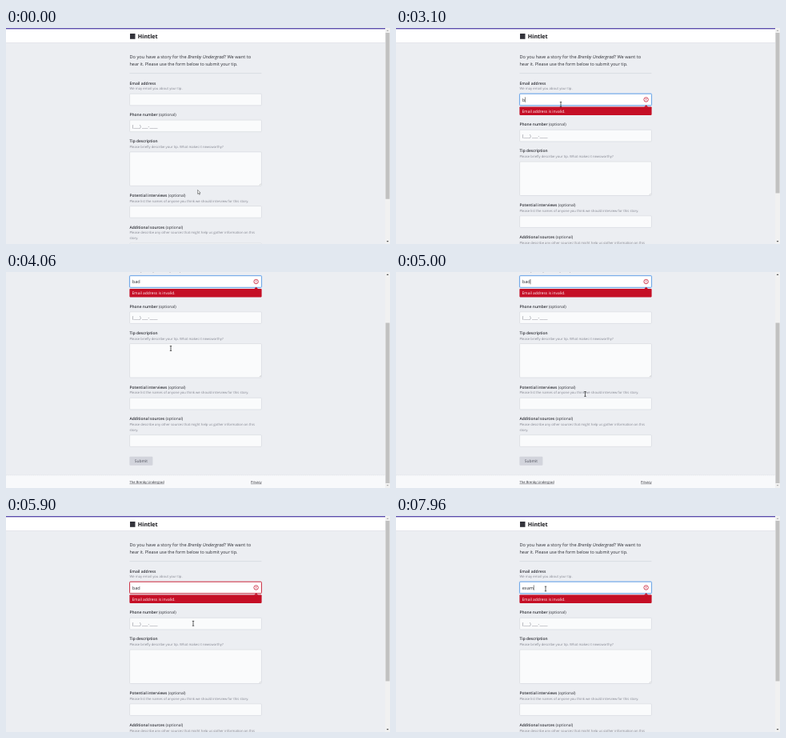
Recreate the animation shown at these times as an HTML page. Size 480 by 270 pixels, loop 8 s.

```html
<!DOCTYPE html>
<html lang="en">
<head>
<meta charset="utf-8">
<title>Hintlet</title>
<style>
html, body { margin: 0; height: 100%; overflow: hidden; background: #eceef2; }
svg { display: block; width: 100vw; height: 100vh; font: 4.9px "Open Sans", "Noto Sans", sans-serif; text-rendering: geometricPrecision; fill: #2b2c33; }
text { white-space: pre; }
.bold { font-weight: 600; }
.title { font-size: 7.1px; font-weight: 700; fill: #18181c; }
.intro { font-size: 5.65px; }
.intro2 { font-size: 5.47px; }
.help { font-size: 4.23px; fill: #82848f; }
.foot { font-size: 4.1px; text-decoration: underline; }
.typed { font-size: 5.6px; }
.mask { font-size: 5.6px; fill: #777983; }
.field { fill: #fafbfc; stroke: #d0d3da; stroke-width: .6; }
</style>
</head>
<body>
<svg viewBox="0 0 480 270">
  <rect width="480" height="270" fill="#eceef2"/>
  <g id="page">
    <rect width="474" height="18.5" fill="#fff"/>
    <rect width="474" height="1.4" fill="#5f52ae"/>
    <path d="M0 18.6H474" stroke="#d9dbe2" stroke-width=".6"/>
    <rect x="155" y="7" width="6.5" height="6.8" fill="#33333b"/>
    <text class="title" x="164.8" y="12.9">Hintlet</text>
    <text class="intro" x="154.5" y="38.2">Do you have a story for the <tspan font-style="italic">Brenby Undergrad</tspan>? We want to</text>
    <text class="intro2" x="154.5" y="47.1">hear it. Please use the form below to submit your tip.</text>
    <path d="M154.5 56.6H319.5" stroke="#cdd0d8" stroke-width=".6"/>
    <text class="bold" x="154.5" y="70.5">Email address</text>
    <text class="help" x="154.5" y="77.2">We may email you about your tip.</text>
    <rect id="halo" x="153.6" y="81.2" width="166.8" height="16.6" rx="1.8" fill="#cfe0f7"/>
    <rect id="email" class="field" x="154.6" y="82.2" width="164.8" height="14.6" rx="1"/>
    <text id="typed" class="typed" x="157.8" y="91.8"></text>
    <path id="caret" stroke="#111" stroke-width=".5"/>
    <g id="error">
      <circle cx="312.6" cy="89.5" r="2.7" fill="none" stroke="#c4112b" stroke-width=".8"/>
      <path d="M312.6 88V89.8M312.6 90.5V91.1" stroke="#c4112b" stroke-width=".7"/>
      <path d="M310.2 98.8L312.7 96.3L315.2 98.8Z" fill="#c50f26"/>
      <rect x="154.4" y="98.5" width="165.2" height="10.4" rx=".8" fill="#c50f26"/>
      <text x="157.4" y="105.6" fill="#fff">Email address is invalid.</text>
    </g>
    <g id="below"></g>
  </g>
  <rect x="474" width="6" height="270" fill="#f1f1f1"/>
  <rect id="thumb" x="474.5" width="5" fill="#c1c1c1"/>
  <path id="up" d="M475.6 3.9L477 2.3L478.4 3.9Z"/>
  <path id="down" d="M475.6 266.1L477 267.7L478.4 266.1Z"/>
  <path id="arrow" d="M0 0V5L1.2 4L2 5.9L2.8 5.5L2 3.7H3.5Z" fill="#fff" stroke="#222" stroke-width=".45"/>
  <path id="beam" d="M-1.2 -2.9H1.2M0 -2.9V2.9M-1.2 2.9H1.2" fill="none" stroke="#111" stroke-width=".65"/>
</svg>
<script>
const LOOP = 8000, ERROR_HEIGHT = 12.2, PAGE_HEIGHT = 335.3;
const el = id => document.getElementById(id);
const set = (id, attrs) => { for (const k in attrs) el(id).setAttribute(k, attrs[k]); };
const show = (id, on) => set(id, { visibility: on ? "visible" : "hidden" });

const field = (y, h = 14.6) =>
  `<rect class="field" x="154.6" y="${y}" width="164.8" height="${h}" rx="1"/>`;
const label = (text, y, optional) =>
  `<text x="154.5" y="${y}"><tspan class="bold">${text}</tspan>${optional ? " (optional)" : ""}</text>`;
const help = (text, y) => `<text class="help" x="154.5" y="${y}">${text}</text>`;

el("below").innerHTML =
  label("Phone number", 110, true) + field(115.1) +
  `<text class="mask" x="157.8" y="124.8">(___) ___-____</text>` +
  label("Tip description", 143.1) +
  help("Please briefly describe your tip. What makes it newsworthy?", 149.9) + field(154.9, 42.4) +
  `<path d="M316.8 196.4L318.6 194.6M317.9 196.4L318.6 195.7" stroke="#888" stroke-width=".35"/>` +
  label("Potential interviews", 210.9, true) +
  help("Please list the names of anyone you think we should interview for this story.", 217.7) + field(222.6) +
  label("Additional sources", 250.6, true) +
  help("Please describe any other sources that might help us gather information on this", 257.4) +
  help("story.", 264.2) + field(269) +
  `<rect x="154.4" y="296" width="29" height="11" rx="1" fill="#d2d4dc"/>
   <text x="168.9" y="303.2" text-anchor="middle" fill="#4b4d58">Submit</text>
   <rect y="319.3" width="474" height="20" fill="#f8f9fb"/>
   <path d="M0 319.3H474" stroke="#d3d6dd" stroke-width=".5" stroke-dasharray="1 .7"/>
   <text class="foot" x="154.5" y="329">The Brenby Undergrad</text>
   <text class="foot" x="319.5" y="329" text-anchor="end">Privacy</text>`;

// [time, x, y]
const mouse = [
  [0, 239.6, 202.4], [850, 239.6, 202.4], [1250, 231, 156], [1660, 222.5, 120],
  [2000, 212.4, 95.8], [2350, 206, 95.5], [4280, 206, 95.5], [4700, 228, 122],
  [5100, 238, 158], [5560, 236, 156.8], [5900, 234, 134.3], [6050, 234, 134.3],
  [6550, 190, 91], [6800, 187, 91], [8000, 187, 91]
];
// [time, text]
const typing = [
  [0, ""], [3000, "b"], [3300, "ba"], [3480, "bad"], [6900, "ba"], [7000, "b"],
  [7100, ""], [7300, "e"], [7480, "ex"], [7680, "exa"], [7840, "exam"]
];

const ramp = (t, a, b) => Math.min(1, Math.max(0, (t - a) / (b - a)));
const ease = p => p * p * (3 - 2 * p);

function mouseAt(t) {
  const i = mouse.findIndex(m => m[0] > t);
  const [t0, x0, y0] = mouse[i - 1], [t1, x1, y1] = mouse[i];
  const p = ease(ramp(t, t0, t1));
  return [x0 + (x1 - x0) * p, y0 + (y1 - y0) * p];
}

function draw(t) {
  const [keyTime, text] = typing.findLast(k => k[0] <= t);
  const invalid = t >= 3000;
  const focused = t >= 2580 && t < 5250 || t >= 6680;
  const shift = invalid ? ERROR_HEIGHT : 0;
  const height = PAGE_HEIGHT + shift;
  const scroll = (height - 270) * (ease(ramp(t, 3720, 3960)) - ease(ramp(t, 5620, 5860)));

  set("page", { transform: `translate(0 ${-scroll})` });
  set("below", { transform: `translate(0 ${shift})` });
  show("error", invalid);
  show("halo", focused);
  el("email").style.cssText = focused ? "fill:#fff;stroke:#4a90df;stroke-width:.8"
    : invalid ? "fill:#fff;stroke:#c50f26;stroke-width:.9" : "";

  el("typed").textContent = text;
  const caretX = 158 + el("typed").getComputedTextLength();
  const since = Math.max(keyTime, t >= 6680 ? 6680 : 2580);
  set("caret", { d: `M${caretX} 86.4V92.9` });
  show("caret", focused && (t - since) % 1060 < 530);

  const track = 258;
  set("thumb", { y: 6 + scroll * track / height, height: 270 * track / height });
  set("up", { fill: scroll > 0 ? "#505050" : "#b0b0b0" });
  set("down", { fill: scroll < height - 270.01 ? "#505050" : "#b0b0b0" });

  const [x, y] = mouseAt(t), beam = t > 2080;
  set(beam ? "beam" : "arrow", { transform: `translate(${x} ${y})` });
  show("beam", beam);
  show("arrow", !beam);
}

const start = performance.now();
function tick() {
  draw((performance.now() - start) % LOOP);
  requestAnimationFrame(tick);
}
tick();
</script>
</body>
</html>
```
